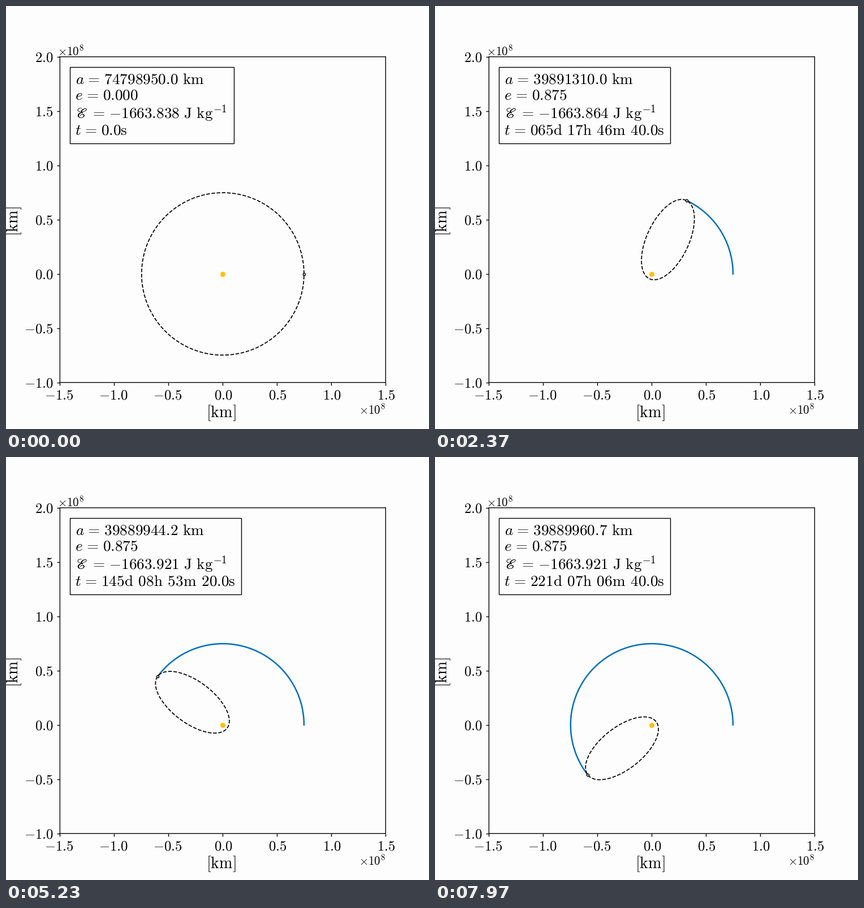
A matplotlib script for the animation above (8 s loop, 748 by 748 pixels).

```python
import numpy as np
import matplotlib.pyplot as plt
from matplotlib.animation import FuncAnimation
from matplotlib.patches import Rectangle

plt.rcParams["mathtext.fontset"] = "cm"

SIZE, DPI = 748, 100
FRAMES, INTERVAL = 250, 32        # one loop lasts 8 s
STEP = 80000                      # simulated seconds per step
STEPS_PER_MS = 0.03
LAST_STEP = 239

MU = 1.327474512e11               # km^3 / s^2
R = 74798950.0                    # km
RATE = 1.991047e-7                # rad / s
A_MEAN, A_AMP = 39890836.149, 1112.76
ECC = 0.875

BG = "#fdfdfd"
TEXT_PX, TICK_PX, LABEL_PX, OFFSET_PX = 27.2, 24.6, 28.2, 21
BOX_LEFT, BOX_TOP, BOX_BOTTOM = 113, 107.5, 243
GAP = r"\hspace{0.12}"
EQUALS = GAP + "=" + GAP

fig = plt.figure(figsize=(SIZE / DPI, SIZE / DPI), dpi=DPI, facecolor=BG)
side = 0.77
left = (0.125 + 0.9 - side) / 2
ax = fig.add_axes([left, 0.11, side, side], facecolor=BG)
ax.set_xlim(-1.5e8, 1.5e8)
ax.set_ylim(-1e8, 2e8)
ax.set_xticks(np.arange(-1.5, 1.6, 0.5) * 1e8, labels=[])
ax.set_yticks(np.arange(-1, 2.1, 0.5) * 1e8, labels=[])
ax.tick_params(width=1)
for spine in ax.spines.values():
    spine.set(linewidth=1, snap=False)


def put(x, y, body, px, **kw):
    """Place math text with its baseline at pixel (x, y) from the top left."""
    kw.setdefault("va", "baseline")
    return fig.text(x / SIZE, 1 - y / SIZE, f"${body}$",
                    fontsize=px * 72 / DPI, color="black", **kw)


def rm(*words, space=0.38):
    """Upright words joined by spaces."""
    glue = rf"\hspace{{{space}}}"
    return glue.join(rf"\mathrm{{{w}}}" for w in words)


def number(v):
    sign = "{-}" if v < 0 else ""
    return rm(f"{sign}{abs(v):.1f}")


# Axis labels
unit = 192
for v in np.arange(-1.5, 1.6, 0.5):
    shift = 1.4 if v < 0 else -0.4
    put(383.4 + v * unit - shift, 695, number(v), TICK_PX, ha="center")
for v in np.arange(-1, 2.1, 0.5):
    put(83.3, 473.8 - v * unit + 8.4, number(v), TICK_PX, ha="right")
put(91, 87, r"{\times}\mathrm{10}^{8}", OFFSET_PX)
put(624, 721, r"{\times}\mathrm{10}^{8}", OFFSET_PX)
put(380.5, 727, rm("[km]"), LABEL_PX, ha="center")
put(21, 381, rm("[km]"), LABEL_PX, ha="center", rotation=90,
    rotation_mode="anchor")

# Moving parts
trail, = ax.plot([], [], color="#006fba", lw=1.8, zorder=2)
orbit, = ax.plot([], [], "--", color="black", lw=1.25, zorder=3)
ax.plot([0], [0], "o", color="#ffc20e", ms=6, mew=0.5, zorder=4)
body, = ax.plot([], [], "o", mfc=BG, mec="black", ms=3, mew=1.1, zorder=5)

# Read-out
box = Rectangle((BOX_LEFT / SIZE, 1 - BOX_BOTTOM / SIZE), 0.1,
                (BOX_BOTTOM - BOX_TOP) / SIZE, transform=fig.transFigure,
                facecolor=BG, edgecolor="black", lw=1, zorder=2)
fig.add_artist(box)
axis_text = put(123, 138, "a", TEXT_PX, zorder=6)
ecc_text = put(122.5, 166, "e", TEXT_PX, zorder=6)
put(123, 198.5, r"\mathscr{E}", 25.5, zorder=6)
energy_text = put(145.9, 198.5, "=", TEXT_PX, zorder=6)
time_text = put(122, 227.5, "t", TEXT_PX, zorder=6)


def clock(t):
    days, rest = divmod(t, 86400)
    hours, rest = divmod(rest, 3600)
    minutes, seconds = divmod(rest, 60)
    words = [f"{seconds:.1f}s"]
    if t >= 60:
        words.insert(0, f"{minutes:02d}m")
    if t >= 3600:
        words.insert(0, f"{hours:02d}h")
    if days:
        words.insert(0, f"{days:03d}d")
    return words


def ellipse(a, e, peri):
    nu = np.linspace(0, 2 * np.pi, 400)
    r = a * (1 - e * e) / (1 + e * np.cos(nu))
    return r * np.cos(nu + peri), r * np.sin(nu + peri)


def update(i):
    k = min(LAST_STEP, int((i * INTERVAL + 27) * STEPS_PER_MS))
    t = k * STEP
    theta = RATE * t
    a = A_MEAN + A_AMP * np.cos(theta)
    energy = -MU / (2 * a)

    path = RATE * STEP * np.arange(k + 1)
    trail.set_data(R * np.cos(path), R * np.sin(path))
    body.set_data([R * np.cos(theta)], [R * np.sin(theta)])

    # The start shows a plain circle before the osculating ellipse takes over
    if k == 0:
        a, e, peri = R, 0.0, 0.0
    else:
        e, peri = ECC, theta + np.pi
    orbit.set_data(*ellipse(a, e, peri))

    value = rm(f"{a:.1f}", "km", space=0.36)
    axis_text.set_text(f"$a{EQUALS}{value}$")
    ecc_text.set_text(f"$e{EQUALS}{rm(f'{e:.3f}')}$")
    value = rm(f"{{-}}{-energy:.3f}", "J", "kg", space=0.35)
    energy_text.set_text(f"${EQUALS}{value}^{{-1}}$")
    time_text.set_text(f"$t{EQUALS}{rm(*clock(t), space=0.41)}$")
    right = 416 if t >= 86400 else 402.5
    box.set_width((right - BOX_LEFT) / SIZE)
    return trail, orbit, body, box, axis_text, ecc_text, energy_text, time_text


anim = FuncAnimation(fig, update, frames=FRAMES, interval=INTERVAL,
                     repeat=True, repeat_delay=0, blit=False,
                     cache_frame_data=False)
plt.show()
```
